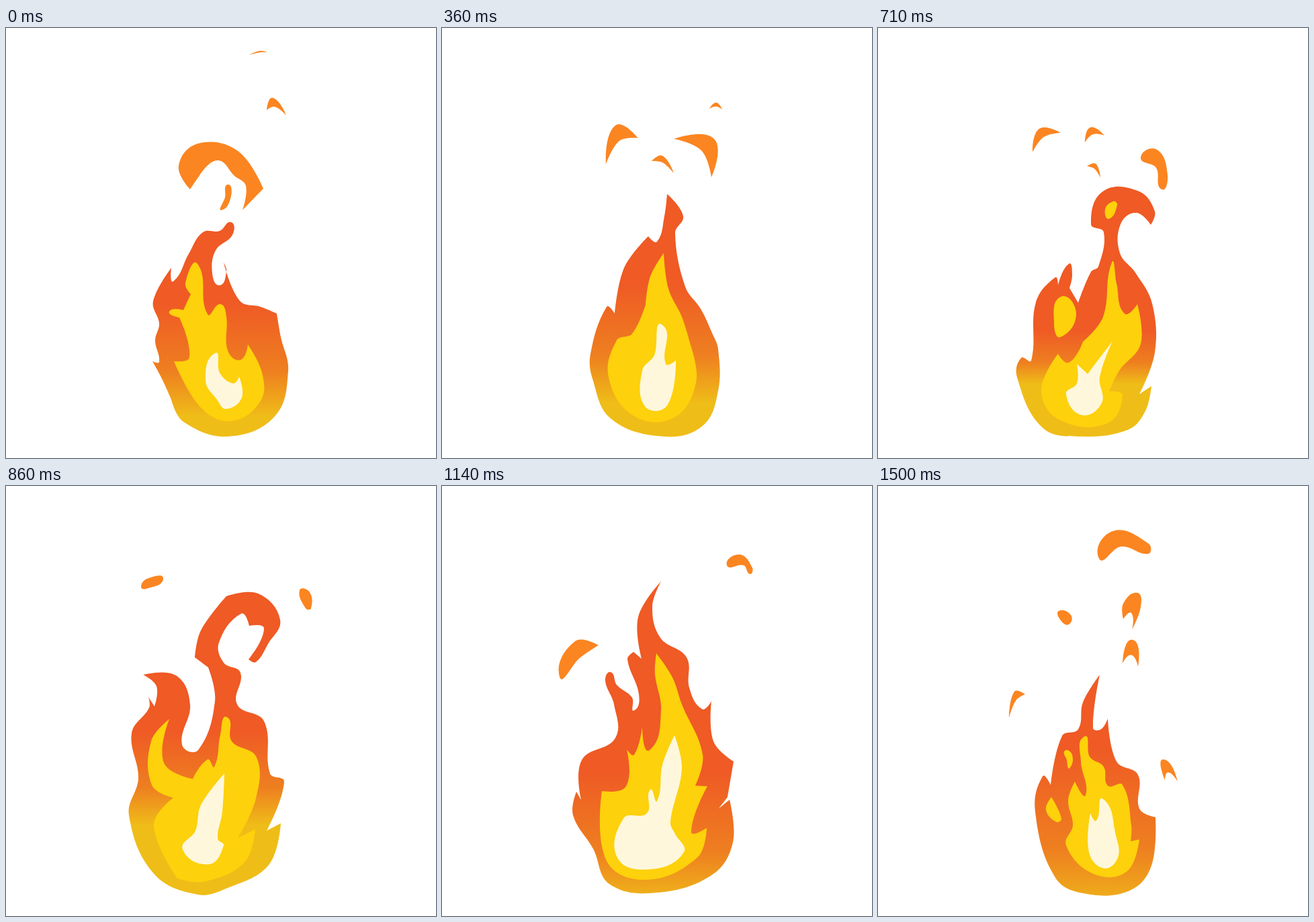
An HTML page for the animation above (1570 ms loop, 640 px wide and 640 px high).

```html
<!DOCTYPE html>
<html lang="en">
<head>
<meta charset="utf-8">
<title>Flame</title>
<style>
html, body { margin: 0; width: 100%; height: 100%; overflow: hidden; background: #fff; }
svg { display: block; width: 100%; height: 100%; }
</style>
</head>
<body>
<svg viewBox="0 0 640 640">
  <linearGradient id="heat" gradientUnits="userSpaceOnUse" x1="0" x2="0">
    <stop offset="0" stop-color="#ef5a25"/>
    <stop offset=".6" stop-color="#ee7f20"/>
    <stop offset="1" stop-color="#efbd18"/>
  </linearGradient>
  <path id="sparks" fill="#fb8521"/>
  <path id="flame" fill="url(#heat)"/>
  <path id="glow" fill="#fdd10b"/>
  <path id="core" fill="#fff7dc"/>
</svg>
<script>
const layers = ["sparks", "flame", "glow", "core"];
const heat = document.getElementById("heat");
const poses = [];
let loop = 0;

// Closed smooth curve through a few points; "!" marks a sharp corner.
function outline(text) {
  const points = text.split(" ").map(p => ({ xy: p.split(",").map(parseFloat), sharp: p.endsWith("!") }));
  if (points.length === 3) hollow(points);
  const at = i => points[(i + points.length) % points.length];
  const handle = (i, length) => {
    const { xy: [x, y], sharp } = at(i);
    if (sharp) return [x, y];
    const [ax, ay] = at(i - 1).xy, [bx, by] = at(i + 1).xy;
    const k = length / (Math.hypot(bx - ax, by - ay) || 1);
    return [x + (bx - ax) * k, y + (by - ay) * k];
  };
  return "M" + points[0].xy + points.map(({ xy: [x, y] }, i) => {
    const end = at(i + 1).xy;
    const reach = 0.37 * Math.hypot(end[0] - x, end[1] - y);
    return "C" + [handle(i, reach), handle(i + 1, -reach), end];
  }).join("") + "Z";
}

// Three points (tip, crown, tip) make a crescent: the inner edge follows the crown.
function hollow(points) {
  const [a, crown, b] = points.map(p => p.xy);
  points[0].sharp = points[2].sharp = true;
  points.push({ xy: crown.map((c, i) => 0.4 * c + 0.3 * (a[i] + b[i])) });
}

function addPose(duration, heatTop, heatBottom, shapes) {
  const pose = { until: loop += duration, heatTop, heatBottom };
  for (const layer of layers) pose[layer] = shapes[layer].split("|").map(outline).join("");
  poses.push(pose);
}

addPose(210, 410, 578, {
  flame: "335,289 337,308 312,331 307,365 318,383 328,362 324,349! 348,406 379,415 403,425! 409,460 420,510 400,578 330,608 264,586 246,553! 232,522 218,496! 228,497 222,465 228,440 219,407 246,357! 249,377 272,336 293,304 318,302",
  glow: "285,351 300,426 319,411 328,430 330,480 349,494 360,471! 381,513 379,555 335,585 290,565 250,496! 273,490 258,431! 243,422 264,420! 275,396! 267,380",
  core: "311,484 318,513 338,529 347,519! 351,550 328,567 314,553 297,525",
  sparks: "362,40 378,34 389,36|388,122 397,104 417,130|257,205 286,172 345,183 383,239! 352,271! 357,235 340,220 315,197 289,218! 274,240!|330,233 335,250 321,271 326,252"
});
addPose(150, 360, 558, {
  flame: "309,238! 343,275 331,300 338,338! 347,323! 361,365 359,405 383,421 393,455! 401,441! 409,464 400,500 408,533 389,580 320,608 273,581 255,564! 259,556! 235,527 239,490 225,430 240,399! 255,414! 255,372 297,303! 302,313! 314,280",
  glow: "314,328! 319,388 352,425 348,483 365,480! 383,530! 355,577 295,579! 260,517 266,485 267,452! 277,476 291,465 288,419! 302,425! 292,380",
  core: "319,463 328,498 337,524 345,515! 347,553 322,567 300,550 300,507! 316,500",
  sparks: "392,87 404,81 413,98 400,97|341,127 357,123 372,145 352,141|234,178 260,131 293,133! 269,150 271,185 256,175 245,198!|313,182 333,170 358,190 352,219! 344,219! 336,190"
});
addPose(140, 380, 558, {
  flame: "335,247! 359,280 347,305 362,385 385,418 402,454 411,478 411,540 388,592 330,608 252,582 224,522 221,485 245,415 257,425! 271,357 307,310! 320,318 331,280",
  glow: "330,335! 337,388 357,430 370,472! 378,528 345,580 285,577 248,520 260,465 283,455 303,412! 310,370",
  core: "328,442 333,500 348,495! 335,562 302,563 298,510 316,487",
  sparks: "244,203 258,145 292,164|312,198 328,190 345,216|345,165 405,165 401,222|398,120 408,111 417,121"
});
addPose(210, 395, 558, {
  flame: "354,255! 379,282 370,306 377,328 366,370 374,390 393,393! 387,420 412,465 405,528! 411,524! 403,580 340,608 243,588 216,522 207,493 231,474 255,428 259,442! 269,375 286,350 314,324! 325,337 350,304 343,283! 359,290",
  glow: "346,341! 342,363 353,385 355,409 371,420 361,459 379,463! 367,515 378,527! 352,575 316,586 265,570 236,522 258,485 258,460 275,455 293,425 293,395 308,377! 321,406! 325,370",
  core: "337,421 332,485 338,497 348,476! 354,495 336,532 325,567 300,565 297,535 289,508 308,508 322,455",
  sparks: "231,137 236,124 250,127 240,137|241,225 262,181 298,202|300,236 315,217 338,247|358,203 418,215 408,291"
});
addPose(150, 450, 530, {
  flame: "335,243 388,243 412,273 406,293! 384,275 361,292 360,335 383,364 408,410 412,483 389,545! 407,533! 398,570 372,598 300,608 245,595 207,520 213,491 228,495 235,408 264,371 268,383! 284,351 289,368 285,387! 298,409! 317,363 328,355 336,304 317,292",
  glow: "348,349 355,380 367,425 386,411! 391,470 359,510 344,541! 364,547 340,589 270,583 243,540 268,485! 284,498 305,467! 335,430|272,400 295,425 272,460 262,440|350,258 356,263 344,284 338,270",
  core: "349,466! 330,520 333,558 303,576 280,545 296,529 296,500! 312,515!",
  sparks: "230,185 240,150 272,156|308,170 316,148 337,160|311,206 324,202 331,223|391,193 415,181 431,218 422,240 414,208"
});
addPose(140, 365, 505, {
  flame: "328,164! 375,160 408,199 390,235 372,262 361,258! 384,212 362,208! 350,190 317,233 324,263 349,278 344,325 384,350 393,428 414,440 388,513! 409,502! 391,564 328,599 285,608 220,577 183,490 197,435 187,368 213,330 212,314! 221,328! 224,298 204,281! 253,282 274,325 262,385 286,393 311,320 301,270! 281,255! 290,215",
  glow: "329,344 336,380 373,404 372,465 345,524! 371,511! 355,560 295,589 255,584! 220,505 249,464! 217,445 216,380 243,347! 235,412 278,436! 300,407 310,418 319,370",
  core: "325,428! 322,485 315,525 324,535 302,563 263,541 282,513 290,475",
  sparks: "201,150 210,138 234,138 209,153|437,155 452,158 454,182 446,182"
});
addPose(140, 395, 560, {
  flame: "335,150! 328,185 337,235 360,295 387,345! 424,428 404,490! 422,482! 408,560 300,608 232,572 189,485 196,398 232,350 222,292! 262,300 275,368 292,358 300,300 290,262! 302,240",
  glow: "324,300! 350,372 383,460! 365,515 382,512! 350,572 265,581 228,527 246,460! 240,415 278,415 320,382",
  core: "336,400! 335,485 334,525 325,563 261,545 285,485 320,455",
  sparks: "172,220 190,183 218,192|433,130 458,118 461,151"
});
addPose(150, 425, 625, {
  flame: "326,142! 313,180 325,226 364,255 368,300 387,332 401,320! 404,380 434,410! 425,463! 412,480! 428,467! 433,530 403,578 322,605 250,593 225,540 195,490 200,455! 207,467! 208,408 258,375 256,325 243,290 251,277 260,296 283,315 286,334 293,310 276,258 285,247! 297,257! 292,195",
  glow: "319,249! 343,285 357,325 388,400 377,446! 395,447! 371,515 394,509! 380,553 305,586 245,558 238,454! 274,447 275,392! 286,400 298,358! 309,393 326,335 317,280",
  core: "346,371! 357,420 340,500 347,518 360,545 315,570 262,555 270,495 305,487 310,452 320,469 328,415",
  sparks: "175,284 198,231 233,237! 205,256|424,118 443,102 462,122 458,131 449,118"
});
addPose(210, 405, 630, {
  flame: "326,215! 325,258 354,305 370,365 393,362! 404,425 424,442! 417,545 388,588 305,608 247,568 213,470 229,455! 264,370 258,318 288,340! 302,270",
  glow: "313,310! 340,370 372,450 391,515! 360,573 275,568 257,520 265,465 284,420! 310,410",
  core: "341,420! 350,530 350,562 288,550 300,505 325,475",
  sparks: "330,153 345,105 372,115|430,62 438,45 447,60|195,303 207,268 226,274|276,217 286,210 294,226"
});
addPose(70, 390, 640, {
  flame: "330,281! 320,360 332,362 342,346! 355,410 387,430 389,480 413,493! 407,565 375,602 310,607 264,583 234,485 245,432 257,445! 274,372 298,362 305,322",
  glow: "307,373 315,403 336,418 342,446 364,445 377,505 376,529! 389,526! 370,574 320,577 280,535 290,505 283,468 293,440! 309,460 302,410|278,394 289,400 285,420 281,408|258,463! 273,495 265,500 250,482",
  core: "335,466 354,520 357,553 336,569 314,545 316,487! 325,498",
  sparks: "329,108 350,67 403,86 402,101 362,90|365,175 386,159 391,180 378,214! 377,189 365,198!|387,269 379,229 364,264|269,186 287,192 284,206 272,200|195,345 203,306 219,310|446,440 425,407 427,438"
});

let shown;
function draw(time) {
  const pose = poses.find(p => time % loop < p.until);
  if (pose === shown) return;
  shown = pose;
  for (const layer of layers) document.getElementById(layer).setAttribute("d", pose[layer]);
  heat.setAttribute("y1", pose.heatTop);
  heat.setAttribute("y2", pose.heatBottom);
}

const start = performance.now();
function tick() {
  draw(performance.now() - start);
  requestAnimationFrame(tick);
}
tick();
</script>
</body>
</html>
```
